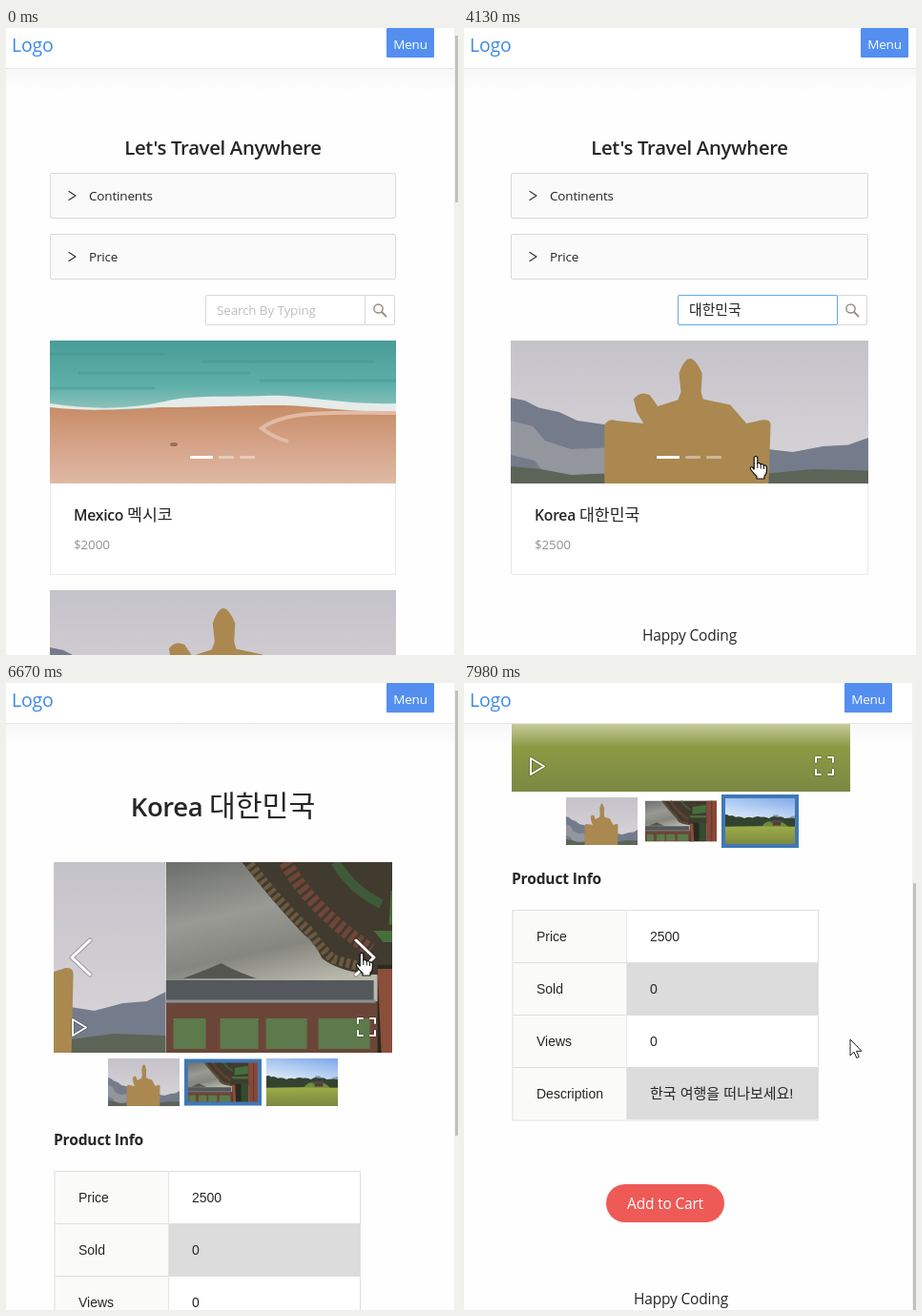
An HTML page for the animation above (8 s loop, 474 by 658 pixels).

```html
<!DOCTYPE html>
<html lang="en">
<head>
<meta charset="utf-8">
<title>Travel shop</title>
<style>
  html, body { margin: 0; width: 100%; height: 100%; overflow: hidden; background: #fefefe; }
  svg { display: block; }
  text { font: 13.5px "Open Sans", "Noto Sans CJK KR", sans-serif; letter-spacing: -.012em; fill: #262626; white-space: pre; }
  .han { font-size: 1.1em; font-weight: 300; letter-spacing: 0; }
  .semi { font-weight: 600; letter-spacing: -.015em; }
  .cell { font: 14px "Liberation Sans", "Noto Sans CJK KR", sans-serif; letter-spacing: 0; }
  .mid { text-anchor: middle; }
  .line { fill: none; stroke-linecap: round; stroke-linejoin: round; }
</style>
</head>
<body>
<svg width="474" height="658" viewBox="0 0 474 658">
  <defs>
    <linearGradient id="sea" x2="0" y2="1"><stop stop-color="#4a9c98"/><stop offset=".6" stop-color="#5fb0aa"/><stop offset="1" stop-color="#9cc9c0"/></linearGradient>
    <linearGradient id="sand" x2="0" y2="1"><stop stop-color="#c58a64"/><stop offset=".45" stop-color="#d3a084"/><stop offset="1" stop-color="#dfb9a4"/></linearGradient>
    <linearGradient id="haze" x2="0" y2="1"><stop stop-color="#c5c3ca"/><stop offset="1" stop-color="#d8d6d8"/></linearGradient>
    <linearGradient id="cloud" x2=".4" y2="1"><stop stop-color="#6c6e6c"/><stop offset=".3" stop-color="#999a94"/><stop offset=".5" stop-color="#85867f"/><stop offset=".7" stop-color="#b9b8ab"/></linearGradient>
    <linearGradient id="sky" x1="1" x2=".6" y2="1"><stop stop-color="#7ea6e8"/><stop offset=".5" stop-color="#b4cff3"/><stop offset="1" stop-color="#e8f0f8"/></linearGradient>
    <linearGradient id="grass" x2="0" y2="1"><stop stop-color="#9fae48"/><stop offset=".4" stop-color="#8f9d45"/><stop offset="1" stop-color="#7b8843"/></linearGradient>
    <linearGradient id="shade" x2="0" y2="1"><stop stop-color="#f3f1f1" stop-opacity=".5"/><stop offset="1" stop-color="#f3f1f1" stop-opacity="0"/></linearGradient>

    <symbol id="beach" viewBox="0 0 363 150" preserveAspectRatio="none">
      <rect width="363" height="80" fill="url(#sea)"/>
      <path d="M0 14H120M160 22H340M30 34H210M220 42H363M0 50H110" stroke="#3f8d8b" stroke-width="3" opacity=".35"/>
      <path d="M0 68C40 72 80 76 125 68S210 70 250 66S320 74 363 70V150H0Z" fill="url(#sand)"/>
      <path d="M0 66C40 72 80 73 120 64C150 56 190 60 225 58S310 68 363 66V74C310 76 280 68 240 68S160 70 125 70S50 76 0 70Z" fill="#e6ecea"/>
      <path d="M363 76C300 76 250 72 222 92Q235 102 250 106" fill="none" stroke="#e2bba5" stroke-width="4"/>
      <ellipse cx="130" cy="109" rx="4" ry="2" fill="#9b6c50"/>
    </symbol>
    <symbol id="statue" viewBox="0 0 355 200" preserveAspectRatio="none">
      <rect width="355" height="200" fill="url(#haze)"/>
      <path d="M0 80L14 84L28 94L48 100L66 112L96 118V200H0ZM255 152L280 156L310 148L335 146L355 136V200H255Z" fill="#747c8b"/>
      <path d="M0 112L22 120L34 140L60 152L94 150V200H40L24 168L0 160Z" fill="#93969d"/>
      <path d="M0 176L30 180L60 188L94 186V200H0ZM255 186L300 180L355 182V200H255Z" fill="#5c6457"/>
      <path d="M93 200V118Q98 108 104 112L132 116L125 100L122 82Q128 70 138 76L146 92L166 83L169 72L167 46Q172 26 178 25Q184 26 190 46L189 72L191 82L218 90L234 116L250 111Q258 110 258 118L256 200Z" fill="#ab8850"/>
    </symbol>
    <symbol id="palace" viewBox="0 0 355 200" preserveAspectRatio="none">
      <rect width="355" height="200" fill="url(#cloud)"/>
      <path d="M18 122Q45 112 58 106Q72 114 95 122Z" fill="#55564f"/>
      <path d="M0 146H230V200H0Z" fill="#6b4638"/>
      <path d="M0 124H218V148H0Z" fill="#54575b"/>
      <path d="M0 146H220" stroke="#8d8f90" stroke-width="3"/>
      <path d="M8 164H42V196H8ZM57 164H97V196H57ZM105 164H148V196H105ZM160 164H214V196H160Z" fill="#5d7a4c"/>
      <path d="M80 0H355V118H214Q180 114 164 101Q156 84 145 76Q112 42 80 0Z" fill="#413a2e"/>
      <path d="M88 2Q120 44 152 74Q162 90 176 102L213 112" fill="none" stroke="#6b5a40" stroke-width="10" stroke-dasharray="4 3"/>
      <path d="M125 0Q155 52 215 92" fill="none" stroke="#6f4637" stroke-width="14" stroke-dasharray="5 3"/>
      <path d="M178 0Q196 30 226 44" fill="none" stroke="#3f5a38" stroke-width="10"/>
      <path d="M236 30L302 20V58L234 66ZM218 72H304V84H228Z" fill="#466f3b"/>
      <path d="M222 108H304V200H222Z" fill="#2a2a20"/>
      <path d="M222 112H238L242 200H226Z" fill="#8b4e3b"/>
      <path d="M268 106H304V196H268Z" fill="#344c2e"/>
      <path d="M304 0H355V200H304Z" fill="#86483a"/>
      <path d="M330 0V200" stroke="#6c3628" stroke-width="5"/>
    </symbol>
    <symbol id="lawn" viewBox="0 0 355 237" preserveAspectRatio="none">
      <rect width="355" height="150" fill="url(#sky)"/>
      <path d="M242 86H268V110H242ZM328 96L355 90V130H328Z" fill="#8f98a0"/>
      <path d="M0 88Q12 82 24 92Q40 86 56 98Q80 92 100 104Q120 94 140 102Q160 90 182 98Q205 94 222 104Q240 90 262 98Q285 92 300 104Q330 98 355 106V148H0Z" fill="#34432f"/>
      <path d="M185 146Q215 108 245 126Q285 106 316 146Z" fill="#6f8a3f"/>
      <path d="M0 146Q180 140 355 146V237H0Z" fill="url(#grass)"/>
      <path d="M240 114H280V140H240Z" fill="#5b3a30"/>
      <path d="M228 126L242 112H282L292 126Z" fill="#4c4a4b"/>
    </symbol>

    <g id="arrow"><path d="M0 0V17L4 13.2L6.8 19.5L9.2 18.5L6.5 12.3H12Z" fill="#fff" stroke="#222" stroke-linejoin="round"/></g>
    <g id="beam"><path d="M-3.5-7.5H-1L0-6.5L1-7.5H3.5M-3.5 7.5H-1L0 6.5L1 7.5H3.5M0-7V7" fill="none" stroke="#111" stroke-width="1.3"/></g>
    <g id="hand"><path d="M-1.8 14V1.8Q0-1 1.8 1.8V8Q4 6.5 5.2 9Q7.4 8 8.4 10Q11 9.4 11.4 12V16Q11 20 9 21V24H1V21.5Q-2 19-5.5 14Q-6 11-3.5 12Z" fill="#fff" stroke="#111" stroke-width="1.2" stroke-linejoin="round"/><path d="M1.8 8V13M5.2 9V13.5M8.4 10V14" stroke="#111"/></g>
  </defs>
  <g id="stage"></g>
</svg>
<script>
const LOOP = 8000;
const stage = document.getElementById('stage');
const BLUE = '#548ff0';

const clamp = v => Math.max(0, Math.min(1, v));
const progress = (t, start, length) => clamp((t - start) / length);
const smooth = p => p * p * (3 - 2 * p);
const easeOut = p => 1 - (1 - p) ** 2;
const latest = (t, steps) => steps.filter(s => s[0] <= t).pop();

const text = (x, y, s, attrs = '') => `<text x="${x}" y="${y}" ${attrs}>${s}</text>`;
const rect = (x, y, w, h, attrs) => `<rect x="${x}" y="${y}" width="${w}" height="${h}" ${attrs}/>`;
const box = (x, y, w, h, fill, stroke) => rect(x + .5, y + .5, w - 1, h - 1, `rx="1.5" fill="${fill}" stroke="${stroke}"`);
const photo = (id, x, y, w, h) => `<use href="#${id}" x="${x}" y="${y}" width="${w}" height="${h}"/>`;
const line = (d, color, width) => `<path class="line" d="${d}" stroke="${color}" stroke-width="${width}"/>`;
const named = (latin, hangul) => `${latin} <tspan class="han">${hangul}</tspan>`;

const typing = [[0, ''], [1250, 'e'], [1320, 'eo'], [1750, 'e'], [1835, ''], [1920, 'ㄷ'], [2005, '대'],
  [2240, '대하'], [2390, '대한'], [2463, '대한ㅁ'], [2537, '대한미'], [2610, '대한민'],
  [2683, '대한민ㄱ'], [2757, '대한민구'], [2830, '대한민국']];

const pointerPath = [[310, 398, 344], [800, 301, 293], [3560, 301, 293], [4100, 306, 449], [4544, 306, 449],
  [4545, 300, 446], [5680, 300, 446], [6380, 379, 295], [6450, 373, 283], [7170, 373, 283], [7540, 393, 358], [7680, 405, 374]];
const pointerKinds = [[310, 'arrow'], [660, 'beam'], [3640, 'arrow'], [3700, 'hand'], [4545, 'arrow'], [6100, 'hand'], [7600, 'arrow']];
const clicks = [[820, 950], [4430, 4545], [6400, 6520], [7030, 7160]];

const slides = [['statue', 200, 50], ['palace', 200, 43], ['lawn', 237, 50]];
const slideStarts = [0, 6480, 7150];

function pointer(t) {
  if (t < pointerPath[0][0]) return '';
  const i = pointerPath.filter(k => k[0] <= t).length - 1;
  const [t0, x0, y0] = pointerPath[i], [t1, x1, y1] = pointerPath[i + 1] || [LOOP, x0, y0];
  const p = smooth(progress(t, t0, t1 - t0));
  const x = x0 + (x1 - x0) * p, y = y0 + (y1 - y0) * p;
  const dot = clicks.some(([a, b]) => t >= a && t < b) ? `<circle cx="${x}" cy="${y + 1}" r="12" fill="#dccb14" opacity=".8"/>` : '';
  return `${dot}<use href="#${latest(t, pointerKinds)[1]}" x="${x.toFixed(1)}" y="${y.toFixed(1)}"/>`;
}

const header = scrolls => {
  const x = scrolls ? 399 : 416;
  return rect(0, 43, 474, 24, 'fill="url(#shade)"') + rect(0, 0, 474, 42, 'fill="#fff"') +
    rect(0, 42, 474, 1, 'fill="#e6e6e6"') + text(6, 25, 'Logo', 'style="font-size:19.5px;fill:#3e8ae8"') +
    rect(x, 0, 50, 31, `rx="1" fill="${BLUE}"`) + text(x + 25, 22, 'Menu', 'class="mid" style="fill:#fff"');
};

const scrollbar = (y, h) => rect(470, 0, 4, 658, 'fill="#f1f1f1"') + rect(471, y, 3, h, 'fill="#c1c1c1"');
const footer = (x, y) => text(x, y, 'Happy Coding', 'class="mid" style="font-size:15.5px"');

const panel = (x, y, w, label) => box(x, y, w, 48, '#fafafa', '#d9d9d9') +
  line(`M${x + 20} ${y + 19.5}l7 4.5l-7 4.5`, '#333', 1.2) + text(x + 41, y + 29, label);

function card(x, y, w, image, title, price) {
  const dots = [[-34.5, 24, 1], [-4.5, 16, .4], [17.5, 16, .4]].map(([dx, width, opacity]) =>
    rect(Math.round(x + w / 2 + dx + .4), y + 121, width, 3, `rx="1" fill="#fff" opacity="${opacity}"`)).join('');
  return box(x, y, w, 246, '#fff', '#e8e8e8') + photo(image, x, y, w, 150) + dots +
    text(x + 25, y + 189, title, 'class="semi" style="font-size:15.7px"') +
    text(x + 25, y + 219, price, 'style="fill:#96918f"');
}

function searchBox(t, x) {
  const value = latest(t, typing)[1];
  const glow = .22 * progress(t, 820, 280) * (1 - progress(t, 3840, 290));
  const border = t < 660 ? '#d9d9d9' : '#62a8f0';
  return box(x + 166, 280, 33, 32, '#fff', '#d9d9d9') +
    `<circle cx="${x + 181.5}" cy="294.5" r="4.6" fill="none" stroke="#998c86" stroke-width="1.5"/>` +
    line(`M${x + 185} 298l4.5 4.5`, '#998c86', 1.8) +
    rect(x - 1, 279, 170, 34, `rx="2" fill="none" stroke="#1890ff" stroke-width="3" opacity="${glow}"`) +
    box(x, 280, 168, 32, '#fff', border) +
    (value ? text(x + 12, 301, value.replace(/[ㄱ-힣]+/, '<tspan class="han">$&</tspan>'), 'id="query"')
           : text(x + 12, 301, 'Search By Typing', 'style="fill:#bfbfbf"')) +
    (t > 820 && t < 3950 ? rect(x + 12, 287, 1, 18, 'id="caret" fill="#111"') : '');
}

function listPage(t) {
  const scrolls = t < 1390;
  const [x, w, mid] = scrolls ? [46, 363, 227.5] : [49, 375, 236.5];
  const korea = y => card(x, y, w, 'statue', named('Korea', '대한민국'), '$2500');
  return header(scrolls) + text(mid, 133, "Let's Travel Anywhere", 'class="semi mid" style="font-size:20.3px"') +
    panel(x, 152, w, 'Continents') + panel(x, 216, w, 'Price') + searchBox(t, scrolls ? 209 : 224) +
    (scrolls ? card(x, 328, w, 'beach', named('Mexico', '멕시코'), '$2000') + korea(590) + scrollbar(8, 175)
             : (t >= 3260 ? korea(328) : '') + footer(mid, 643));
}

function gallery(t, current, height) {
  const shift = current ? 355 * (1 - easeOut(progress(t, slideStarts[current], 450))) : 0;
  const picture = (i, x) => photo(slides[i][0], x, 0, 355, slides[i][1]);
  const bottom = 188 + height, middle = 188 + height / 2, low = bottom - 27;
  const controls = `M88 ${middle - 18}l-19 18l19 18M367 ${middle - 18}l19 18l-19 18`;
  const small = `M70 ${low - 8}v17l14-8.5zM369 ${low - 4}v-5h5M382 ${low - 9}h5v5M387 ${low + 4}v5h-5M374 ${low + 9}h-5v-5`;
  const thumbs = slides.map(([id, , h], i) => {
    const x = 107 + 83 * i, y = bottom + 31 - h / 2;
    return photo(id, x, y, 75, h) +
      (i === current ? rect(x - 1, y - 1, 77, h + 2, 'fill="none" stroke="#3f78b5" stroke-width="4"') : '');
  }).join('');
  return `<svg x="50" y="188" width="355" height="${height}">` +
    (shift ? picture(current - 1, shift - 355) : '') + picture(current, shift) + '</svg>' +
    line(controls, 'rgba(0,0,0,.25)', 5) + line(controls, '#fff', 3) +
    line(small, 'rgba(0,0,0,.25)', 3.5) + line(small, '#fff', 2) + thumbs;
}

function table(y) {
  const rows = [['Price', '2500'], ['Sold', '0'], ['Views', '0'],
    ['Description', '<tspan class="han" style="font-size:15px">한국 여행을 떠나보세요!</tspan>']];
  return rows.map(([label, value], i) => {
    const top = y + 55 * i;
    return rect(51, top, 120, 55, 'fill="#fafaf8"') + rect(171, top, 200, 55, `fill="${i % 2 ? '#dcdcdc' : '#fff'}"`) +
      rect(51, top, 320, 1, 'fill="#dedede"') +
      text(76, top + 33, label, 'class="cell"') + text(195, top + 33, value, 'class="cell"');
  }).join('') + rect(51, y + .5, 320.5, 220.5, 'fill="none" stroke="#dedede"') + rect(170, y, 1, 220, 'fill="#e6e6e6"');
}

function productPage(t) {
  const loaded = t >= 5360;
  const current = slideStarts.filter(s => s <= t).length - 1;
  const height = slides[current][1];
  const base = loaded ? 188 + height : 132;
  const scroll = 311 * smooth(progress(t, 7780, 195));
  return `<g transform="translate(0 ${-scroll})">` +
    text(227.5, 140, named('Korea', '대한민국'), 'class="semi mid" style="font-size:27.5px"') +
    (loaded ? gallery(t, current, height) : '') +
    text(50, base + 97, 'Product Info', 'style="font-size:15.6px;font-weight:700"') + table(base + 124) +
    rect(149, base + 412, 124, 40, 'rx="20" fill="#ee5a56"') +
    text(211, base + 438, 'Add to Cart', 'class="mid" style="font-size:15.5px;fill:#fff"') +
    footer(227.5, base + 538) + '</g>' + header(true) +
    scrollbar(8 + scroll * .65, !loaded ? 635 : height > 200 ? 450 : 467);
}

let shown = '';
function draw(now) {
  const t = now % LOOP;
  const scene = (t < 4545 ? listPage(t) : productPage(t)) + pointer(t);
  if (scene !== shown) {
    stage.innerHTML = shown = scene;
    const query = document.getElementById('query'), caret = document.getElementById('caret');
    if (query && caret) caret.setAttribute('x', Math.round(+query.getAttribute('x') + query.getComputedTextLength()));
  }
  requestAnimationFrame(draw);
}
draw(0);
</script>
</body>
</html>
```
